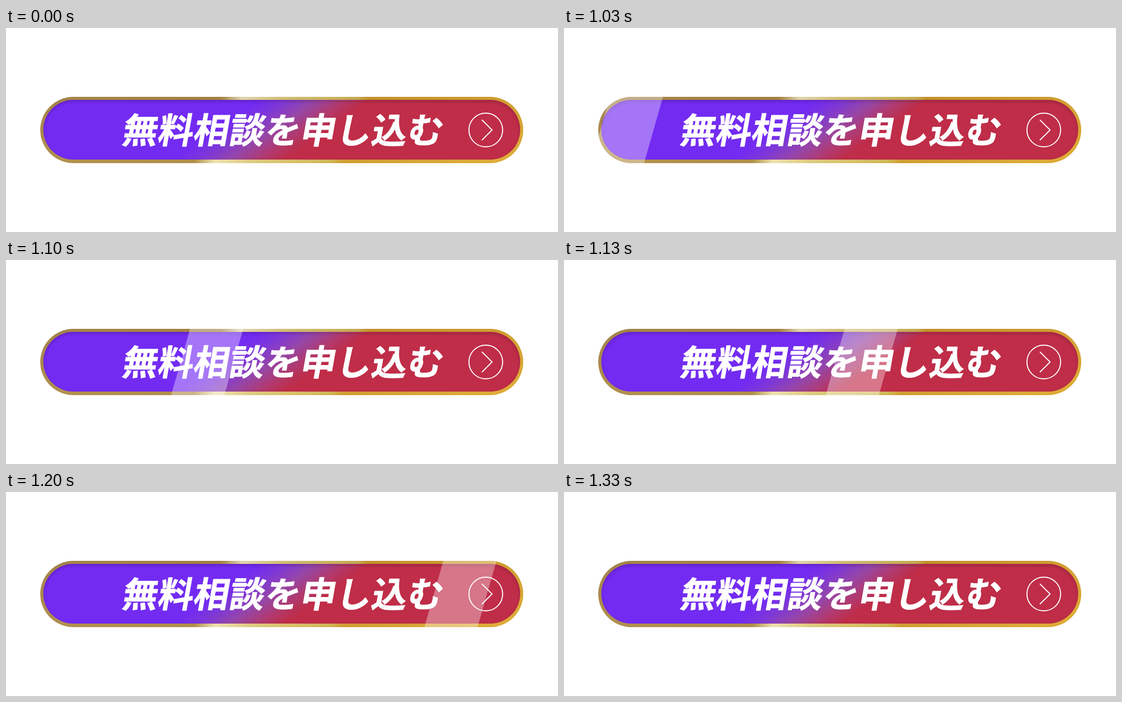
Recreate the animation shown at these times as an HTML page. Size 1080 by 400 pixels, loop 2230 ms.

```html
<!DOCTYPE html>
<html lang="ja">
<head>
<meta charset="utf-8">
<style>
  html, body { margin: 0; width: 100%; height: 100%; overflow: hidden; background: #fff; }
  .pill {
    position: absolute; left: 67px; top: 135px; width: 945px; height: 130px;
    border-radius: 65px; overflow: hidden;
    background:
      linear-gradient(rgba(80, 50, 0, .08), rgba(255, 210, 90, .1)),
      linear-gradient(113deg, #aa8a50 0, #a98748 35.5%, #ece3bb 39.5%, #dcc982 47%,
        #cdb458 62%, #cb982e 64.5%, #d4a032 80%, #dfaa34);
  }
  .face {
    position: absolute; inset: 6px 6px 7px; border-radius: 59px;
    background: linear-gradient(145deg, #732bf2 38.5%, #7d37d8 43%, #9646a8 48.5%, #b03a70 53.5%, #bf2d48 58%);
    box-shadow: inset 0 3px 6px rgba(40, 0, 50, .24);
  }
  .shine {
    position: absolute; left: 0; top: 0; width: 141px; height: 130px;
    background: rgba(255, 255, 255, .35);
    clip-path: polygon(37px 0, 100% 0, 104px 100%, 0 100%);
  }
  svg { position: absolute; left: 0; top: 0; }
  text {
    font: 900 69px "Noto Sans CJK JP", "Noto Sans CJK", sans-serif;
    letter-spacing: .7px; stroke: #fff; stroke-width: 1;
  }
</style>
</head>
<body>
<div class="pill">
  <div class="face"></div>
  <div class="shine" id="shine"></div>
</div>
<svg width="1080" height="400" fill="#fff">
  <text transform="translate(225 226) skewX(-10)">無料相談を申し込む</text>
  <g fill="none" stroke="#fff" stroke-width="2">
    <circle cx="938.7" cy="200" r="33"/>
    <path d="M931 180l20 20-20 20"/>
  </g>
</svg>
<script>
  const LOOP = 2230, START = 900, FPS = 30, STEPS = 13;
  const shine = document.getElementById('shine');
  const begin = performance.now();

  // Left top corner of the light band: slow, fast, slow.
  const bandX = k => 491.7 + 541 * Math.tanh((k - 6.7) / 2.82);
  // Step times are rounded to 10 ms.
  const stepTime = k => START + Math.round(k * 100 / FPS) * 10;

  function draw() {
    const t = (performance.now() - begin) % LOOP;
    let k = -1;
    while (k < STEPS && t >= stepTime(k + 1)) k++;
    const on = k >= 0 && k < STEPS;
    shine.style.visibility = on ? 'visible' : 'hidden';
    if (on) shine.style.transform = `translateX(${bandX(k) - 104}px)`;
    requestAnimationFrame(draw);
  }
  draw();
</script>
</body>
</html>
```
